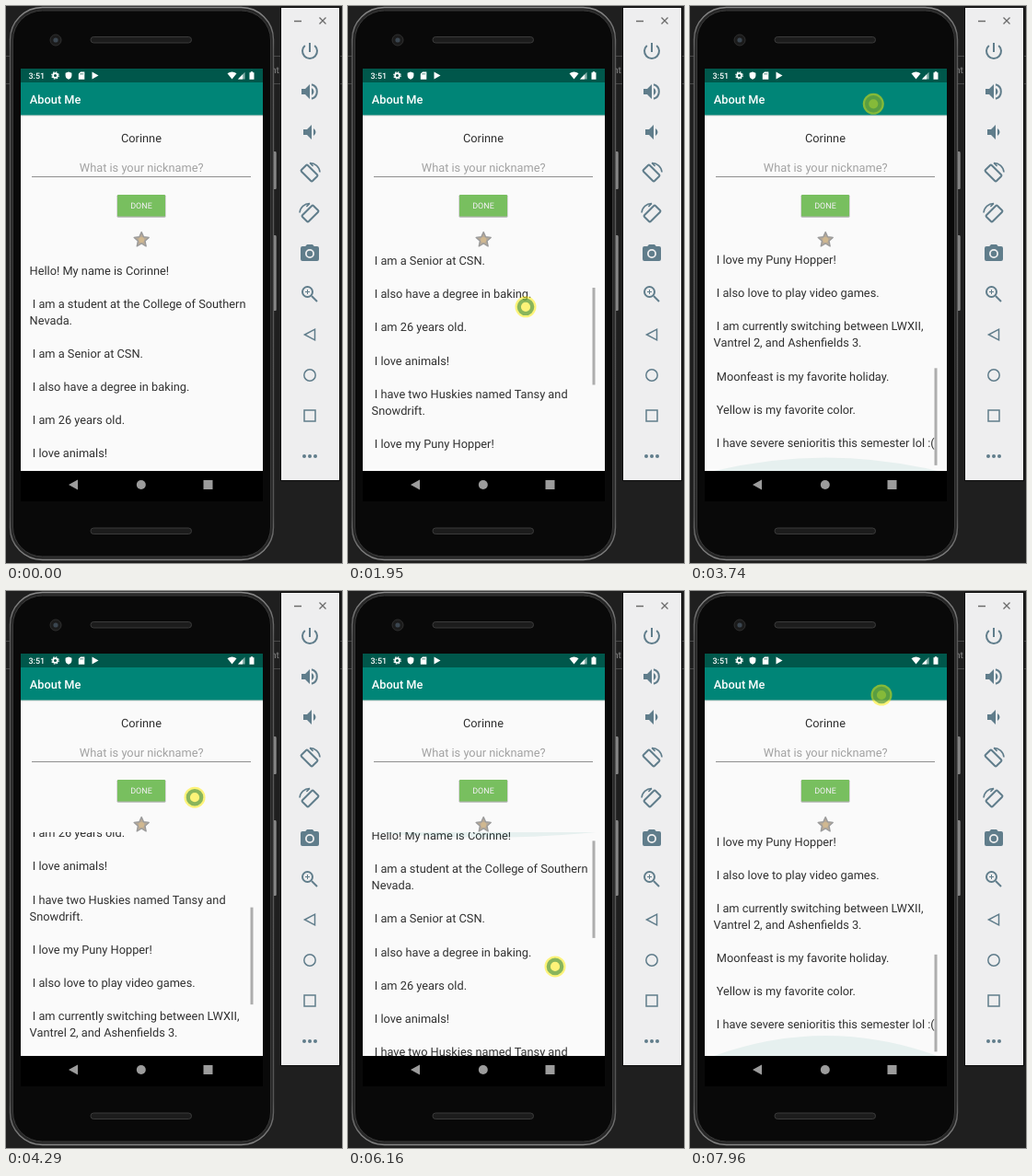
Animation of 365x605 px, one loop 8 s. Source, as an HTML page:

```html
<!DOCTYPE html>
<html lang="en">
<head>
<meta charset="utf-8">
<title>About Me</title>
<style>
  html, body { margin: 0; width: 100%; height: 100%; overflow: hidden; background: #1f1f1f; }
  svg { display: block; width: 365px; height: 605px; }
  text { font-family: Roboto, "Open Sans", sans-serif; font-size: 12.79px; white-space: pre; text-rendering: geometricPrecision; }
  .mid { text-anchor: middle; }
  .icon { fill: #607d8b; }
  .line { fill: none; stroke: #607d8b; stroke-width: 2; }
</style>
</head>
<body>
<svg viewBox="0 0 365 605" xmlns="http://www.w3.org/2000/svg">
  <defs>
    <linearGradient id="rim" x1="0" y1="0" x2="0" y2="1">
      <stop offset="0" stop-color="#8a8a8a"/>
      <stop offset=".08" stop-color="#5a5a5a"/>
      <stop offset=".92" stop-color="#555"/>
      <stop offset="1" stop-color="#858585"/>
    </linearGradient>
    <linearGradient id="key">
      <stop offset="0" stop-color="#444"/>
      <stop offset=".6" stop-color="#999"/>
      <stop offset="1" stop-color="#555"/>
    </linearGradient>
    <clipPath id="view"><rect x="16" y="262" width="263" height="243"/></clipPath>
    <clipPath id="edges"><rect x="26" y="262" width="243" height="243"/></clipPath>
  </defs>

  <!-- desktop behind the emulator -->
  <rect width="365" height="605" fill="#1f1f1f"/>
  <path d="M0 54.5H365M0 84.5H365" stroke="#484848"/>
  <text x="288" y="73" fill="#8c8c8c" style="font-size:10px">nt</text>

  <!-- phone body -->
  <rect x="289" y="158" width="5" height="41" rx="1.5" fill="url(#key)"/>
  <rect x="289" y="249" width="5" height="82" rx="1.5" fill="url(#key)"/>
  <rect x="4.5" y="1.5" width="286" height="600" rx="35" fill="#262626" stroke="url(#rim)" stroke-width="1.4"/>
  <rect x="7.5" y="5" width="280" height="593" rx="32" fill="#090909" stroke="#3a3a3a"/>
  <rect x="92" y="33.5" width="109.500" height="6.500" rx="3.200" fill="#1c1c1c" stroke="#3b3b3b"/>
  <rect x="92" y="567" width="109.500" height="6.500" rx="3.200" fill="#1c1c1c" stroke="#3b3b3b"/>
  <circle cx="54" cy="37" r="6" fill="#1b1b1b" stroke="#303030"/>
  <circle cx="54" cy="37" r="2.600" fill="#3b4650"/>

  <!-- screen -->
  <rect x="16" y="68" width="263" height="470" fill="#000"/>
  <rect x="16" y="118" width="263" height="387" fill="#fafafa"/>
  <rect x="16" y="68" width="263" height="15" fill="#00574b"/>
  <rect x="16" y="118" width="263" height="1.500" fill="#cfd3d2"/>
  <rect x="16" y="83" width="263" height="35.500" fill="#008577"/>
  <g fill="#fff">
    <text x="24.500" y="79.200" font-weight="500" style="font-size:8.95px">3:51</text>
    <circle cx="53.500" cy="75.500" r="2.400" fill="none" stroke="#fff" stroke-width="1.700"/>
    <circle cx="53.500" cy="75.500" r="3.700" fill="none" stroke="#fff" stroke-width="1.200" stroke-dasharray="1.600 1.300"/>
    <path d="M68 71.500l3.400 1.300v2.700c0 2-1.400 3.600-3.400 4.300c-2-.7-3.400-2.300-3.400-4.300v-2.700z"/>
    <path d="M81 71.500h4.300v8.200h-6.500v-6z"/>
    <path d="M81.500 73v1.500M83.300 73v1.500" stroke="#00574b" stroke-width=".8"/>
    <path d="M93.500 71.500l7 4l-7 4z"/>
    <path d="M245.500 79.500l-5-6.300q5-3.600 10 0z"/>
    <path d="M252 79.500h7.500v-7.800z" fill-opacity=".55"/>
    <path d="M252 79.500h5v-5.200z"/>
    <path d="M264.500 72.300h1.300v-1h2.400v1h1.300v7.400h-5z"/>
    <text x="25.800" y="105.600" font-weight="500">About Me</text>
  </g>

  <text class="mid" x="147" y="147.600" fill="#303030">Corinne</text>
  <text class="mid" x="147.200" y="180.400" fill="#a2a2a2">What is your nickname?</text>
  <path d="M28 185.500H266" stroke="#8f8f8f"/>
  <rect x="120.500" y="205" width="53" height="24.800" rx="1.500" fill="#b4b4b4"/>
  <rect x="121" y="205" width="52" height="23.600" rx="1.200" fill="#78bf5f"/>
  <text class="mid" x="147" y="220.100" fill="#f5f0f7" style="font-size:8.95px">DONE</text>

  <!-- scrolling text -->
  <g clip-path="url(#view)"><g id="list" fill="#303030"></g></g>
  <g clip-path="url(#edges)" fill="#008577" fill-opacity=".08">
    <path id="topGlow"/>
    <path id="endGlow"/>
  </g>
  <rect id="thumb" x="265.500" width="3" height="105.500" fill="#adadad"/>
  <path id="star" fill="#b9aa96" stroke="#9b9b9b" stroke-width="1.400" stroke-linejoin="round"/>
  <circle cx="147.200" cy="254" r="3" fill="#d0b890"/>

  <g fill="#9c9c9c">
    <path d="M68 520l10-5.500v11z"/>
    <circle cx="146.800" cy="520" r="5"/>
    <rect x="214.500" y="515" width="10" height="10"/>
  </g>

  <!-- emulator tool panel -->
  <rect x="298" y="1" width="65" height="515" fill="#0c0c0c"/>
  <rect x="299" y="2" width="63" height="513" fill="#eeeeef"/>
  <path d="M313 16.500h8M340.500 12.500l7 7m0-7l-7 7" fill="none" stroke="#6b6b6b" stroke-width="1.300"/>
  <g id="tools"></g>

  <g id="touch">
    <circle r="11.500" fill="#ffeb00" fill-opacity=".52"/>
    <circle id="ring" r="7.200" fill="none" stroke="#3c8c4a" stroke-opacity=".6" stroke-width="4.200"/>
  </g>
</svg>
<script>
const LOOP = 8000, MAX = 304, TOP = 262, END = 505, LAG = 40;
const $ = id => document.getElementById(id);
const clamp = (v, lo, hi) => Math.min(hi, Math.max(lo, v));

// Blank strings are the empty lines of the text.
const lines = [
  "Hello! My name is Corinne!", "",
  " I am a student at the College of Southern", "Nevada.", "",
  " I am a Senior at CSN.", "",
  " I also have a degree in baking.", "",
  " I am 26 years old.", "",
  " I love animals!", "",
  " I have two Huskies named Tansy and", "Snowdrift.", "",
  " I love my Puny Hopper!", "",
  " I also love to play video games.", "",
  " I am currently switching between LWXII,", "Vantrel 2, and Ashenfields 3.", "",
  " Moonfeast is my favorite holiday.", "",
  " Yellow is my favorite color.", "",
  " I have severe senioritis this semester lol :("
];
$("list").innerHTML = lines.map((s, i) =>
  s && `<text x="25.6" y="${291.5 + 18.07 * i}">${s}</text>`).join("");

$("star").setAttribute("d", "M" + Array.from({ length: 10 }, (_, i) => {
  const r = i % 2 ? 4 : 8.4, a = i * Math.PI / 5;
  return `${(147.2 + r * Math.sin(a)).toFixed(2)} ${(254 - r * Math.cos(a)).toFixed(2)}`;
}).join("L") + "Z");

// Tool icons, each drawn around its own centre.
const speaker = x => `<path class="icon" d="M${x} -3v6h4l5 5v-16l-5 5z"/>`;
const wave = x => `<path class="icon" d="M${x} -4q2.500 1.300 2.500 4t-2.500 4z"/>`;
const rotate = flip => `<g class="line" transform="scale(${flip} 1)">
  <rect x="-8.500" y="-4.800" width="17" height="9.600" rx="1.200" transform="translate(-.5 .5) rotate(45)"/>
  <path stroke-width="1.600" d="M0 -10.500A10.800 10.800 0 0 1 11 -.5M0 -10.500l3.600 3.400"/></g>`;
const tools = [
  `<path class="line" d="M0 -9v10M-5.200 -6.100a8 8 0 1 0 10.400 0"/>`,
  speaker(-9) + wave(2) + `<path class="line" d="M2 -7.700a8 8 0 0 1 0 15.400"/>`,
  speaker(-7) + wave(4),
  rotate(1),
  rotate(-1),
  `<path class="icon" d="M-3 -10l-1.800 2h-3.200q-2 0-2 2v12q0 2 2 2h16q2 0 2-2v-12q0-2-2-2h-3.200l-1.800-2z"/>
   <circle r="4.100" fill="#607d8b" stroke="#eeeeef" stroke-width="1.800"/>`,
  `<circle class="line" cx="-2.500" cy="-2.500" r="5.500"/>
   <path class="line" d="M2 2l6 6"/><path class="line" stroke-width="1" style="stroke-width:1" d="M-5 -2.500h5M-2.500 -5v5"/>`,
  `<path class="line" style="stroke-width:1.500" d="M-5.500 0l11-5.800v11.600z"/>`,
  `<circle class="line" r="6.200" style="stroke-width:1.500"/>`,
  `<rect class="line" x="-6" y="-6" width="12" height="12" style="stroke-width:1.500"/>`,
  [-6, 0, 6].map(x => `<circle class="icon" cx="${x}" r="2"/>`).join("")
];
$("tools").innerHTML = tools.map((d, i) =>
  `<g transform="translate(330 ${49 + 44 * i})">${d}</g>`).join("");

// Smooth curve through [time, value] points, without overshoot.
function curve(keys) {
  const slope = i => (keys[i + 1][1] - keys[i][1]) / (keys[i + 1][0] - keys[i][0]);
  const tangent = i => {
    if (i === 0 || i === keys.length - 1) return 0;
    const a = slope(i - 1), b = slope(i);
    return a * b <= 0 ? 0 : 2 * a * b / (a + b);
  };
  const m = keys.map((_, i) => tangent(i));
  m[m.length - 1] = slope(keys.length - 2);
  return t => {
    if (t <= keys[0][0]) return keys[0][1];
    const i = keys.findIndex(k => k[0] > t) - 1;
    if (i < 0) return keys[keys.length - 1][1];
    const [t0, a] = keys[i], [t1, b] = keys[i + 1];
    const h = t1 - t0, u = (t - t0) / h, v = 1 - u;
    return a * v * v * (1 + 2 * u) + b * u * u * (3 - 2 * u)
      + h * u * v * (m[i] * v - m[i + 1] * u);
  };
}

const touchX = curve([[470, 271], [1100, 200], [1420, 200], [1950, 193], [2960, 192],
  [3500, 197], [4290, 205], [5000, 217], [5700, 226], [6160, 225], [7260, 213], [7880, 210], [7960, 208]]);
const touchY = curve([[470, 588], [1100, 441], [1420, 441], [1950, 327], [2270, 269],
  [2960, 153], [3120, 133], [3210, 132], [3500, 99], [3620, 99], [4290, 224], [4460, 257],
  [5000, 356], [5400, 413], [5700, 434], [5850, 434], [6160, 408], [7030, 249], [7260, 207],
  [7880, 122], [7960, 113]]);
const topPull = curve([[5250, 0], [5600, 1], [5850, 1], [6250, 0]]);
const endPull = curve([[3080, 0], [3400, 1], [3640, 1], [3900, 0], [7740, 0], [7880, 1], [7960, 1]]);

// The list follows the finger a little late; each turn restarts from a stop.
function scrollAt(t) {
  if (t < 1330) return 0;
  const y = touchY(t - LAG);
  const s = t < 3600 ? 436 - y : t < 5800 ? MAX + 99 - y : 434 - y;
  return clamp(s, 0, MAX);
}

function glow(id, edge, dir, pull) {
  const h = 22 * pull * dir;
  $(id).setAttribute("d", pull > .01 ? `M26 ${edge}Q147.500 ${edge + 2 * h} 269 ${edge}Z` : "");
}

function draw(t) {
  const s = scrollAt(t);
  $("list").setAttribute("transform", `translate(0 ${-s})`);
  $("thumb").setAttribute("y", TOP + .437 * s);
  $("thumb").style.opacity = t < 1470 ? 0 : 1;
  glow("topGlow", TOP, 1, topPull(t));
  glow("endGlow", END, -1, endPull(t));
  $("touch").setAttribute("transform", `translate(${touchX(t)} ${touchY(t)})`);
  $("touch").style.display = t < 480 ? "none" : "";
  $("ring").style.display = t < 1330 ? "none" : "";
}

const start = performance.now();
function tick() {
  draw((performance.now() - start) % LOOP);
  requestAnimationFrame(tick);
}
tick();
</script>
</body>
</html>
```
